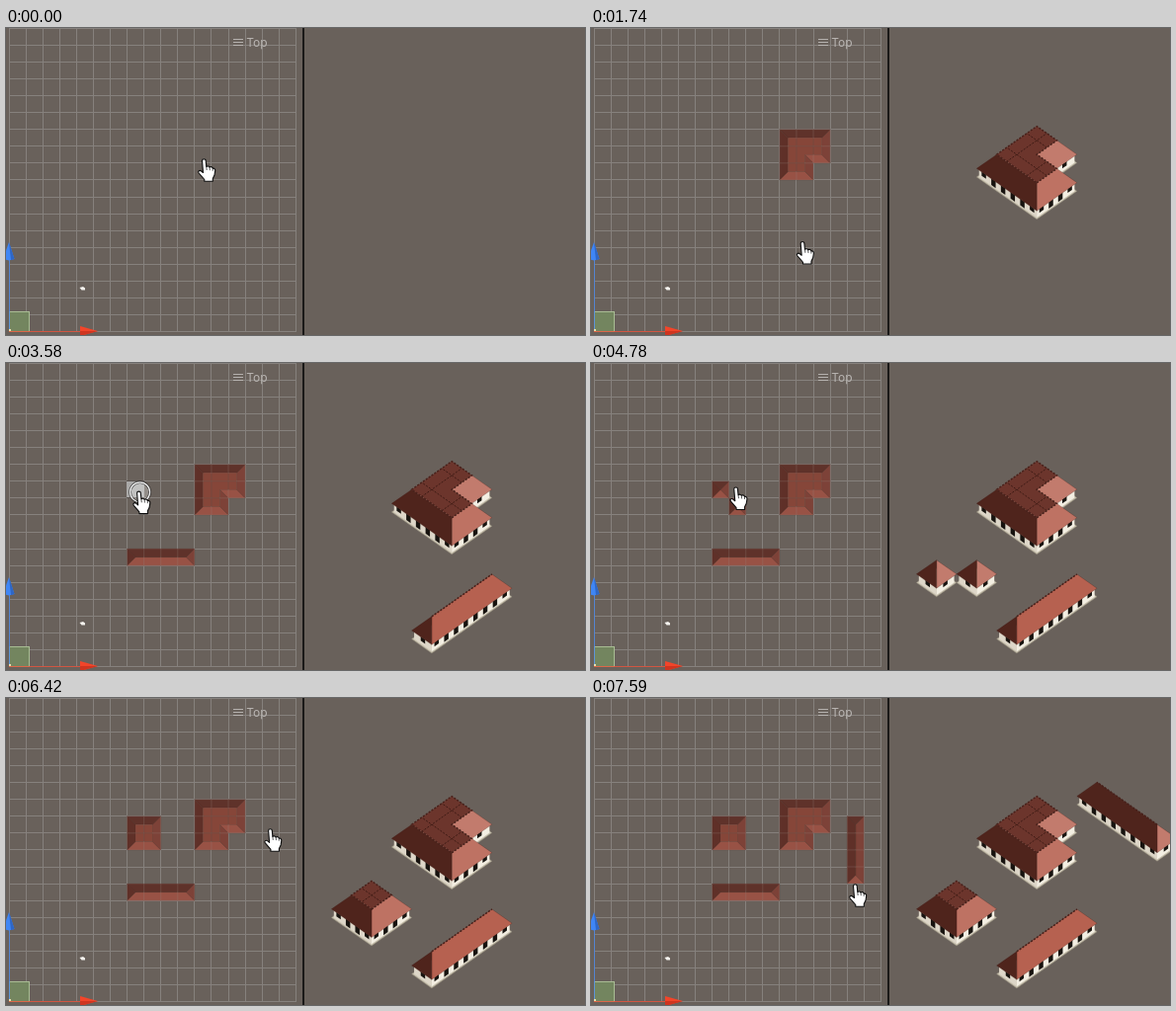
An HTML page with a canvas that plays this animation: 586x311 px, repeating every 8000 ms.

```html
<!DOCTYPE html>
<html lang="en">
<head>
<meta charset="utf-8">
<title>Grid house builder</title>
<style>
html, body { margin: 0; width: 586px; height: 311px; overflow: hidden; background: #69615b; }
canvas { display: block; }
</style>
</head>
<body>
<canvas width="586" height="311"></canvas>
<script>
const g = document.querySelector('canvas').getContext('2d');
const LOOP = 8000, STEP = 135, CELL = 17.08, EAVE = 0.42, RIDGE = 1.12;

const topView = ([x, z]) => [3 + CELL * x, 307.65 - CELL * z];
const isoView = ([x, z], h = 0) =>
  [370 + 20.3 * (x - z + 2), 251 - 14.3 * (x + z - 16) - 20.3 * h];

// One drag over cells: press and lift times, first cell, then moves up, down, left, right
function drag(press, lift, x, z, moves = '') {
  const cells = [[x, z]];
  for (const m of moves) {
    x += { L: -1, R: 1 }[m] || 0;
    z += { D: -1, U: 1 }[m] || 0;
    cells.push([x, z]);
  }
  const gap = (lift - 60 - press) / Math.max(1, moves.length);
  return { press, lift, cells, gap, built: lift + 130 };
}

const drags = [
  drag(250, 1190, 11, 9, 'UURRDLD'),
  drag(2285, 2590, 10, 6, 'LLL'),
  drag(3480, 3700, 7, 10),
  drag(4370, 4500, 8, 9),
  drag(4900, 5030, 8, 10),
  drag(5315, 5465, 7, 9),
  drag(6660, 7325, 15, 10, 'DDD')
];

// Pointer path: resting points plus the cells of every drag, as [time, x, y]
const path = [
  [0, 201, 133], [120, 201, 133], [1200, 218, 137], [1850, 214, 233], [2160, 199, 206],
  [3150, 136, 198], [4240, 137, 132], [4700, 147, 126], [6030, 136, 142], [6320, 268, 133],
  [7540, 268, 189]
];
for (const d of drags) {
  d.cells.forEach(([x, z], i) => {
    const [px, py] = topView([x + 0.5, z + 0.5]);
    path.push([d.press + d.gap * i, px + 4, py + 2]);
  });
  path.push([d.lift - 1, ...path[path.length - 1].slice(1)]);
}
path.sort((a, b) => a[0] - b[0]);

const rect = (x, z, w, d) => [[x, z], [x + w, z], [x + w, z + d], [x, z + d]];

// Outline, drag that builds it, drag that replaces it
const houses = [
  [rect(15, 7, 1, 4), 6],
  [[[11, 9], [13, 9], [13, 10], [14, 10], [14, 12], [11, 12]], 0],
  [rect(7, 10, 1, 1), 2, 4],
  [rect(8, 9, 1, 1), 3, 4],
  [[[7, 10], [8, 10], [8, 9], [9, 9], [9, 11], [7, 11]], 4, 5],
  [rect(7, 9, 2, 2), 5],
  [rect(7, 6, 4, 1), 1]
];

const topTones = { N: '#5f322a', W: '#5f3028', S: '#985245', E: '#7d4238', flat: '#864639' };
const isoTones = { W: '#4f241c', flat: '#6c352c' };

function pointer(t) {
  const i = path.findIndex(k => k[0] > t);
  if (i < 0) return path[path.length - 1].slice(1);
  const [a, b] = [path[i - 1], path[i]], f = (t - a[0]) / (b[0] - a[0]);
  return [a[1] + (b[1] - a[1]) * f, a[2] + (b[2] - a[2]) * f];
}

function poly(points, fill, stroke, width = 0.8) {
  g.beginPath();
  points.forEach(p => g.lineTo(...p));
  g.closePath();
  if (fill) { g.fillStyle = fill; g.fill(); }
  if (stroke) { g.strokeStyle = stroke; g.lineWidth = width; g.stroke(); }
}

function line(a, b, color) {
  g.beginPath();
  g.moveTo(...a);
  g.lineTo(...b);
  g.strokeStyle = color;
  g.lineWidth = 1;
  g.stroke();
}

function box(x, y, w, h, color) {
  g.fillStyle = color;
  g.fillRect(x, y, w, h);
}

const next = (list, i) => list[(i + 1) % list.length];
const side = (a, b) => b[0] > a[0] ? 'S' : b[0] < a[0] ? 'N' : b[1] > a[1] ? 'E' : 'W';
const span = (a, b) => Math.hypot(b[0] - a[0], b[1] - a[1]);

// Shrink a counter-clockwise outline of axis-aligned edges
function inset(outline, d) {
  const inward = { S: [0, d], N: [0, -d], E: [-d, 0], W: [d, 0] };
  return outline.map((p, i) => {
    const before = outline[(i + outline.length - 1) % outline.length];
    const m = inward[side(before, p)], n = inward[side(p, next(outline, i))];
    return [p[0] + m[0] + n[0], p[1] + m[1] + n[1]];
  });
}

// Cell lines clipped to an outline
function cellLines(points, view, color) {
  g.save();
  poly(points);
  g.clip();
  for (let k = 6; k < 17; k++) {
    line(view([k, 5], RIDGE), view([k, 13], RIDGE), color);
    line(view([6, k], RIDGE), view([17, k], RIDGE), color);
  }
  g.restore();
}

function roof(outline, view, tone, seam) {
  const inner = inset(outline, 0.5), flat = inner.map(p => view(p, RIDGE));
  outline.forEach((p, i) => {
    const q = next(outline, i), fill = tone(side(p, q), span(p, q));
    if (fill) poly([view(p, EAVE), view(q, EAVE), next(flat, i), flat[i]], fill, seam, 0.6);
  });
  poly(flat, tone('flat'));
}

function topRoof(outline) {
  roof(outline, topView, s => topTones[s], 'rgba(60,25,18,.2)');
  cellLines(inset(outline, 0.5).map(topView), topView, 'rgba(60,25,18,.3)');
  cellLines(outline.map(topView), topView, 'rgba(150,135,125,.28)');
}

function wall(p, q, color) {
  const at = (f, h) => isoView([p[0] + (q[0] - p[0]) * f, p[1] + (q[1] - p[1]) * f], h);
  const panel = (a, b, low, high, c) =>
    poly([at(a, low), at(b, low), at(b, high), at(a, high)], c);
  panel(0, 1, 0, EAVE, color);
  const length = span(p, q), n = length < 1.1 ? 1 : Math.round(length * 2);
  for (let i = 0; i < n; i++) {
    const f = (i + 0.5) / n, w = 0.11 / length, end = i === 0 || i === n - 1;
    panel(f - w, f + w, end ? 0.15 : 0.03, 0.36, '#17130f');
  }
}

function house(outline) {
  poly(outline.map(p => isoView(p)), '#c8c1ae', '#8d8677', 0.6);
  const base = inset(outline, 0.06);
  base.forEach((p, i) => {
    const q = next(base, i), s = side(p, q);
    if (s === 'S') wall(p, q, '#f3eee2');
    if (s === 'W') wall(p, q, '#ddd6c8');
  });
  const sunny = length => `hsl(10 41% ${62 - 2.7 * length}%)`;
  roof(outline, isoView, (s, length) => s === 'S' ? sunny(length) : isoTones[s], 'rgba(60,25,18,.4)');
  const flat = inset(outline, 0.5).map(p => isoView(p, RIDGE));
  g.setLineDash([2, 1.5]);
  cellLines(flat, isoView, '#3d1a14');
  poly(flat, null, '#47201a', 1.5);
  g.setLineDash([]);
}

function scene() {
  box(0, 0, 586, 311, '#69615b');
  for (let k = 0; k < 19; k++) {
    const [x, y] = topView([k, k]).map(Math.floor);
    if (k < 18) box(x, 0, 1, 307, '#86817d');
    box(3, y, 291, 1, '#86817d');
  }
}

function gizmos() {
  box(3, 287, 21, 21, '#a9bd94');
  box(4, 288, 19, 19, '#73855f');
  box(3, 235, 1, 72, 'rgba(63,134,245,.7)');
  box(3, 307, 73, 1, 'rgba(242,69,42,.7)');
  box(3, 305, 2, 2, '#e4dfb0');
  poly([[3, 217], [8.5, 234], [3, 235.5], [-3, 234]], '#3f86f5');
  poly([[3, 217], [8.5, 234], [5, 235.3]], '#2f66c4');
  poly([[75, 302], [93, 307], [75, 312]], '#f2452a');
  poly([[75, 307], [93, 307], [75, 312]], '#cf3520');
  poly([[74.5, 263], [78, 262], [80, 263.5], [80, 265.5], [76.5, 265.5]], '#f4f2ee');
  for (const y of [11, 14, 17]) box(230, y, 10, 1, '#b5b1ae');
  g.font = '12px Inter, Roboto, sans-serif';
  g.fillStyle = '#b8b4b1';
  g.fillText('Top', 243.3, 19);
  box(300, 0, 2, 311, '#1b1918');
}

function paint({ press, gap, cells }, t) {
  cells.forEach(([x, z], i) => {
    if (i && t < press + gap * (i - 0.5)) return;
    const [left, top] = topView([x, z + 1]).map(Math.floor);
    box(left, top, 18, 18, '#5b5450');
    box(left, top + 1, 18, 16, '#aaa9a8');
  });
}

const hand = new Path2D('M-2.5 1.5C-2.5-.8 1.2-.8 1.2 1.5L1.8 7.5C3 6.5 4.6 7 5 8C6.5 7.2 8 8 8.2 9.2' +
  'C9.8 8.7 10.8 10 10.7 11.5L10 16L8.3 19.5V22.3H-.2V20.5L-5.8 14C-7.2 12-5 10.5-3.3 12L-1.5 13.5Z');
const fingers = new Path2D('M1.8 7.5L2.2 11M5 8L5.3 11.2M8.2 9.2L8.2 11.8');

function cursor([x, y], pressed) {
  g.save();
  g.translate(x, y);
  if (pressed) {
    g.beginPath();
    g.arc(0.5, 0.5, 10, 0, 7);
    g.fillStyle = 'rgba(255,255,255,.28)';
    g.fill();
    g.strokeStyle = 'rgba(20,20,20,.75)';
    g.lineWidth = 2.6;
    g.stroke();
    g.strokeStyle = '#f4f4f4';
    g.lineWidth = 1.3;
    g.stroke();
  }
  g.lineJoin = 'round';
  g.fillStyle = '#fff';
  g.strokeStyle = '#0c0c0c';
  g.lineWidth = 1.1;
  g.fill(hand);
  g.stroke(hand);
  g.lineWidth = 0.7;
  g.stroke(fingers);
  g.restore();
}

function draw(now) {
  const t = now % LOOP;
  const pose = Math.max(0, Math.floor((t + 15) / STEP) * STEP - 15);
  scene();
  for (const [outline, first, last] of houses) {
    if (t < drags[first].built || (last && t >= drags[last].built)) continue;
    topRoof(outline);
    house(outline);
  }
  const active = drags.find(d => t >= d.press && t < d.built);
  if (active) paint(active, pose);
  gizmos();
  cursor(pointer(pose), active && t < active.lift);
  requestAnimationFrame(draw);
}
requestAnimationFrame(draw);
</script>
</body>
</html>
```
